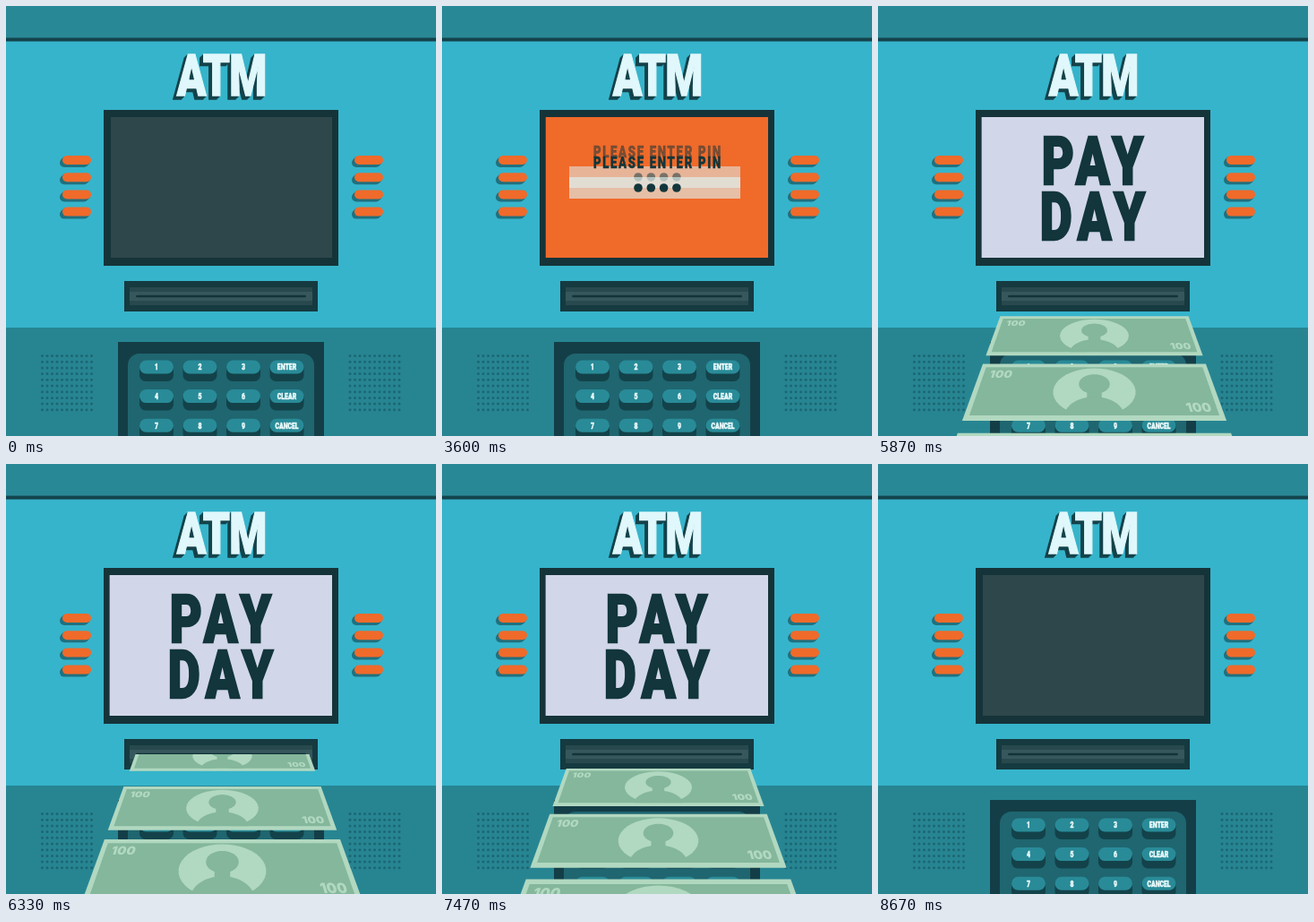
An HTML page with a canvas that plays this animation: 480 by 480 pixels, repeating every 9.34 s.

```html
<!DOCTYPE html>
<html lang="en">
<head>
<meta charset="utf-8">
<title>Pay day</title>
<style>
html, body { margin: 0; width: 100%; height: 100%; overflow: hidden; background: #36b4cb; }
canvas { display: block; width: 480px; height: 480px; }
</style>
</head>
<body>
<canvas id="stage" width="480" height="480"></canvas>
<script>
const ctx = document.getElementById('stage').getContext('2d');
const LOOP = 9340, FPS = 15;
const DARK = '#12363b', ORANGE = '#f06a2a', PALE = '#e0f8fb', TEAL = '#278592';
const SCREEN = [115.5, 124, 248.5, 157];

const ramp = (t, from, to) => Math.min(1, Math.max(0, (t - from) / (to - from)));
const easeOut = p => 1 - (1 - p) ** 3;

function rect(color, x, y, w, h, radius = 0) {
  ctx.fillStyle = color;
  ctx.beginPath();
  ctx.roundRect(x, y, w, h, radius);
  ctx.fill();
}

function disc(color, x, y, r) {
  ctx.fillStyle = color;
  ctx.beginPath();
  ctx.arc(x, y, r, 0, 7);
  ctx.fill();
}

// Narrow heavy lettering, centred on x with its baseline at y
function label(text, x, y, size, color, spacing = 0, outline = 0) {
  ctx.save();
  ctx.translate(x, y);
  ctx.scale(0.75, 1);
  ctx.font = `900 ${size}px Roboto, sans-serif`;
  ctx.letterSpacing = spacing + 'px';
  ctx.textAlign = 'center';
  ctx.fillStyle = ctx.strokeStyle = color;
  ctx.lineWidth = outline;
  ctx.fillText(text, spacing / 2, 0);
  if (outline) ctx.strokeText(text, spacing / 2, 0);
  ctx.restore();
}

function withAlpha(alpha, draw) {
  ctx.save();
  ctx.globalAlpha *= alpha;
  draw();
  ctx.restore();
}

function sign() {
  for (let d = 4; d > 0; d--) label('ATM', 241 - d, 100.3 + d, 64, '#15434b', -1, 1.5);
  label('ATM', 241, 100.3, 64, PALE, -1, 1.5);
}

function sideButtons(x) {
  for (let i = 0; i < 4; i++) {
    const y = 167 + i * 19.2;
    for (let d = 3; d > 0; d--) rect('#20717f', x - d, y + d, 32, 10, 5);
    rect(ORANGE, x, y, 32, 10, 5);
  }
}

function speaker(x) {
  for (let row = 0; row < 10; row++)
    for (let col = 0; col < 11; col++)
      disc('#1c6674', x + col * 5.5, 390.5 + row * 6.7, 1.5);
}

function keypad() {
  rect('#143e47', 125, 375, 230, 110);
  rect('#1f6670', 136, 388, 208, 110, 13);
  const rows = [['1', '2', '3', 'ENTER'], ['4', '5', '6', 'CLEAR'], ['7', '8', '9', 'CANCEL']];
  rows.forEach((row, r) => row.forEach((name, c) => {
    const x = 168 + c * 48.5, y = 403 + r * 32.6;
    rect('#13424a', x - 19, y - 6, 38, 22, 7);
    rect('#298b98', x - 19, y - 7.5, 38, 15, 7.5);
    label(name, x, y + 3.3, 9.2, '#f0fdfe', 0, 0.5);
  }));
}

function machine() {
  rect('#36b4cb', 0, 0, 480, 480);
  rect('#298896', 0, 0, 480, 36);
  rect('#14444d', 0, 35.5, 480, 4);
  rect(TEAL, 0, 359, 480, 121);
  sign();
  sideButtons(63);
  sideButtons(389);
  speaker(40.5);
  speaker(384);
  keypad();
  rect('#153439', 109, 116, 262, 174);
  rect('#153a40', 132, 307, 216, 34);
  rect('#28494e', 138, 314, 204, 20);
  rect('#36585d', 138, 319, 204, 10);
  rect('#12343a', 145, 322.7, 190, 2.6, 1.3);
}

function pinView(t, dy, fieldAlpha, textAlpha) {
  withAlpha(fieldAlpha, () => rect(PALE, 142, 191 + dy, 191, 24));
  withAlpha(textAlpha, () => {
    label('PLEASE ENTER PIN', 240, 181 + dy, 17.5, DARK, 2.3, 0.5);
    [2270, 2470, 2600, 2800].forEach((start, i) => {
      if (t >= start - 5) disc(DARK, 219 + i * 14.3, 203 + dy, 4.8);
    });
  });
}

function screenContent(t) {
  rect(ORANGE, ...SCREEN);
  const enter = easeOut(ramp(t, 1067, 1733));
  const leave = ramp(t, 3533, 3800);
  if (!leave) {
    if (enter) pinView(t, 30 * (1 - enter), enter, enter);
  } else {
    pinView(t, -48 * leave, 0.7 * (1 - leave), 0.7 * (1 - leave));
    if (leave < 0.3) pinView(t, 0, 0.6, 1);
  }
  withAlpha(ramp(t, 3733, 4130), () => rect('#d2d6e9', ...SCREEN));
  [['PAY', 199, 4130], ['DAY', 261, 4400]].forEach(([word, y, start]) => {
    const p = easeOut(ramp(t, start, start + 467));
    withAlpha(p, () => label(word, 239.5, y + 30 * (1 - p), 74, DARK, 9, 2.5));
  });
}

function screen(t) {
  rect('#2e474b', 117, 124, 247, 157);
  const power = ramp(t, 267, 600) * (1 - ramp(t, 8333, 8660));
  if (!power) return;
  ctx.save();
  ctx.beginPath();
  ctx.rect(...SCREEN);
  ctx.clip();
  withAlpha(power, () => screenContent(t));
  ctx.restore();
}

// Sloping plane: x is -1..1 across a bill, s counts bill pitches out of the slot
function project(x, s) {
  const depth = 1 - 0.146 * s;
  return [241.5 + 98.5 * x / depth, 58 + 270.3 / depth];
}

function bill(top) {
  const at = (x, v) => project(x, top + v * 0.85);
  const light = '#b1d8c0', green = '#84b79b';
  const shape = (color, points) => {
    ctx.fillStyle = color;
    ctx.beginPath();
    points.forEach(([x, v]) => ctx.lineTo(...at(x, v)));
    ctx.fill();
  };
  const box = (x, v0, v1) => [[-x, v0], [x, v0], [x, v1], [-x, v1]];
  const oval = (v, rx, rv, from = 0, to = 2 * Math.PI) =>
    Array.from({ length: 41 }, (_, i) => {
      const a = from + (to - from) * i / 40;
      return [rx * Math.cos(a), v + rv * Math.sin(a)];
    });
  const amount = (x, v) => {
    const [px, py] = at(x, v), [ax, ay] = at(x + 0.01, v), [bx, by] = at(x, v + 0.01);
    ctx.save();
    ctx.transform((ax - px) * 0.105, (ay - py) * 0.105, (bx - px) * 0.2, (by - py) * 0.2, px, py);
    ctx.font = '900 100px Inter, sans-serif';
    ctx.textAlign = 'center';
    ctx.fillStyle = light;
    ctx.fillText('100', 0, 36);
    ctx.restore();
  };

  shape(light, box(1, 0, 1));
  shape(green, box(0.96, 0.07, 0.92));
  shape(light, oval(0.51, 0.34, 0.42));
  shape(green, oval(0.39, 0.13, 0.18));
  shape(green, box(0.06, 0.5, 0.75));
  shape(green, oval(0.92, 0.23, 0.3, Math.PI, 2 * Math.PI));
  amount(-0.81, 0.2);
  amount(0.82, 0.79);
}

function bills(t) {
  ctx.save();
  ctx.beginPath();
  ctx.rect(0, 324, 480, 156);
  ctx.clip();
  for (let i = -1; i < 13; i++) {
    const travel = 2.43 + (t - 5867) * 0.00491 - i;
    // Bills shoot out of the slot, then glide at a steady speed
    const top = travel < 0 ? travel * 1.8 : travel;
    if (top > -1 && top < 2.6) bill(top);
  }
  ctx.restore();
}

const start = performance.now();
function loop() {
  const now = (performance.now() - start) % LOOP;
  const t = Math.floor((now + 5) * FPS / 1000) * 1000 / FPS;
  machine();
  screen(t);
  bills(t);
  requestAnimationFrame(loop);
}
loop();
</script>
</body>
</html>
```
